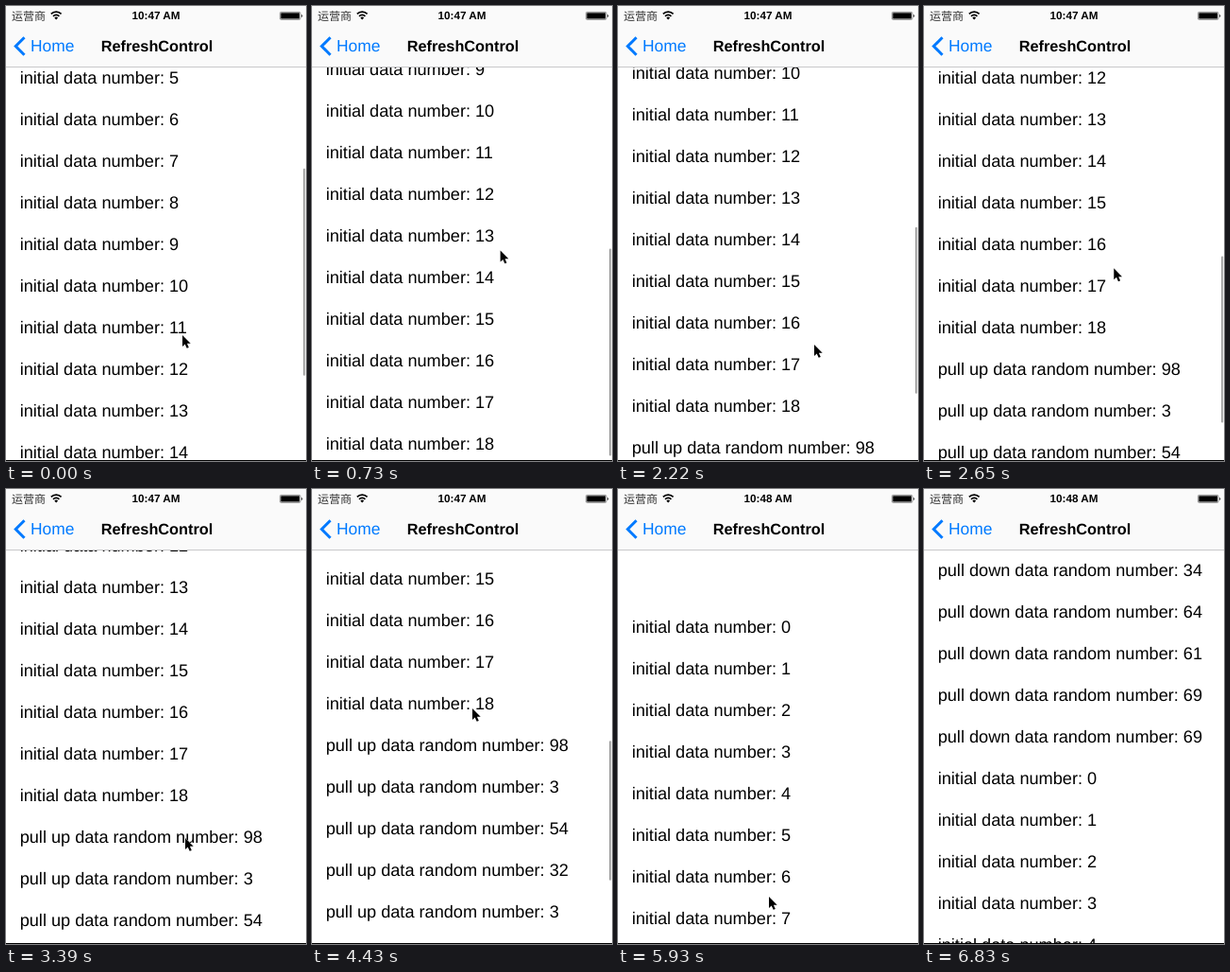
Animation of 318x481 px, one loop 7.6 s. Source, as an HTML page:

```html
<!DOCTYPE html>
<html lang="en">
<head>
<meta charset="utf-8">
<title>RefreshControl</title>
<style>
  html, body { margin: 0; width: 100%; height: 100%; overflow: hidden; background: #fff; }
  svg { display: block; width: 318px; height: 481px; }
  text { font-family: "Liberation Sans", Arial, sans-serif; text-rendering: geometricPrecision; white-space: pre; }
  #list { font-size: 18.15px; }
  .bold { font-weight: bold; }
  .carrier { font-family: "Noto Sans CJK SC", "Noto Sans CJK", sans-serif; }
</style>
</head>
<body>
<svg viewBox="0 0 318 481">
  <rect width="318" height="481" fill="#fff"/>
  <g id="list"></g>
  <rect id="bar" x="315" width="2.2" rx="1" fill="#aaa"/>

  <rect width="318" height="64" fill="#fafafa"/>
  <rect y="64" width="318" height="1" fill="#c8c8ca"/>
  <text class="carrier" x="6" y="14.5" font-size="12" fill="#333">运营商</text>
  <g fill="none" stroke="#000" stroke-width="1.7">
    <path d="M47.8 8.4a7.6 7.6 0 0 1 10.8 0M50 10.8a4.5 4.5 0 0 1 6.4 0"/>
    <path d="M53.2 14.4l-1.9-2a2.7 2.7 0 0 1 3.8 0z" fill="#000" stroke="none"/>
  </g>
  <text id="clock" class="bold" x="133.5" y="14.3" font-size="11.7"></text>
  <rect x="290.4" y="6.4" width="21.6" height="8" rx="1.2" fill="none" stroke="#777" stroke-width=".8"/>
  <rect x="291.3" y="7.3" width="19.8" height="6.2"/>
  <path d="M313.3 8.7a2 2 0 0 1 0 3.4z"/>
  <path d="M19.5 33.3L10.3 42.5l9.2 9.2" fill="none" stroke="#007aff" stroke-width="3"/>
  <text x="26" y="48.3" font-size="17.4" fill="#007aff">Home</text>
  <text class="bold" x="160" y="48.3" font-size="16.3" text-anchor="middle">RefreshControl</text>

  <path id="cursor" d="M0 1v12l2.7-2.5 2 4.3 2.1-.9-1.9-4.1h3.8z" stroke="#fff" stroke-width=".8" paint-order="stroke"/>
  <rect y="480" width="318" height="1"/>
</svg>
<script>
const LOOP = 7600, TICK = 148, ROW = 44, VIEW = 416, BATCH = 5, INITIAL = 19;
const FIRST_UP = 13, SECOND_UP = 29, PULL_DOWN = 42; // ticks at which rows load
const $ = id => document.getElementById(id);
const list = $('list'), bar = $('bar'), cursor = $('cursor'), clock = $('clock');

// Row 0 is the first initial one; pulled-down rows sit above it.
function addRows(labels, first, shownFrom) {
  return labels.map((label, i) => {
    const el = document.createElementNS('http://www.w3.org/2000/svg', 'text');
    el.setAttribute('x', 14.7);
    el.setAttribute('y', 92 + (first + i) * ROW);
    el.textContent = label;
    list.append(el);
    return { el, shownFrom };
  });
}
const rows = [
  ...addRows(Array.from({ length: INITIAL }, (_, i) => `initial data number: ${i}`), 0, 0),
  ...addRows([98, 3, 54, 32, 3].map(n => `pull up data random number: ${n}`), INITIAL, FIRST_UP),
  ...addRows([34, 64, 61, 69, 69].map(n => `pull down data random number: ${n}`), -BATCH, PULL_DOWN)
];

// Each gesture eases to a new scroll offset and cursor place, then holds.
const rest = { scroll: 230, x: 187, y: 347 };
const gestures = [
  { from: 0, to: 6, scroll: 420, x: 200, y: 255 },
  { from: 7, to: 10, scroll: 424, x: 217, y: 405 },
  { from: 10, to: 15, scroll: 455, x: 208, y: 357 },
  { from: 15, to: 20, scroll: 554, x: 200, y: 261 },
  { from: 21, to: 23, scroll: 554, x: 190, y: 368 },
  { from: 24, to: 30, scroll: 651, x: 170, y: 231 },
  { from: 31, to: 35, scroll: -7, x: 164, y: 380 },
  { from: 35, to: 39, scroll: -60, x: 160, y: 430 },
  { from: 41, to: 46, scroll: 0, x: -14, y: 445 }
];

function poseAt(tick) {
  const pose = { ...rest };
  for (const g of gestures) {
    const u = Math.min(Math.max((tick - g.from) / (g.to - g.from), 0), 1);
    for (const key in pose) pose[key] += (g[key] - pose[key]) * u * (2 - u);
  }
  return pose;
}

function drawBar(scroll, tick) {
  const loads = (tick >= FIRST_UP) + (tick >= SECOND_UP);
  const content = (INITIAL + loads * BATCH) * ROW, max = content - VIEW;
  const inside = Math.min(Math.max(scroll, 0), max);
  const full = 12 + VIEW * VIEW / content;
  const length = full - Math.abs(scroll - inside);
  bar.setAttribute('y', scroll > max ? 478 - length : 66 + inside / max * (412 - full));
  bar.setAttribute('height', length);
  const idle = (tick > 22 && tick < 25) || tick > 38;
  bar.style.display = idle ? 'none' : '';
}

function draw(ms) {
  const tick = Math.floor((ms % LOOP + 16) / TICK);
  const { scroll, x, y } = poseAt(tick);
  const inserted = tick >= PULL_DOWN ? BATCH * ROW : 0;
  list.setAttribute('transform', `translate(0 ${Math.round(inserted - scroll)})`);
  for (const { el, shownFrom } of rows) el.style.display = tick < shownFrom ? 'none' : '';
  drawBar(scroll, tick);
  cursor.setAttribute('transform', `translate(${x} ${y})`);
  clock.textContent = tick < 38 ? '10:47 AM' : '10:48 AM';
}

const start = performance.now();
function frame() {
  draw(performance.now() - start);
  requestAnimationFrame(frame);
}
frame();
</script>
</body>
</html>
```
